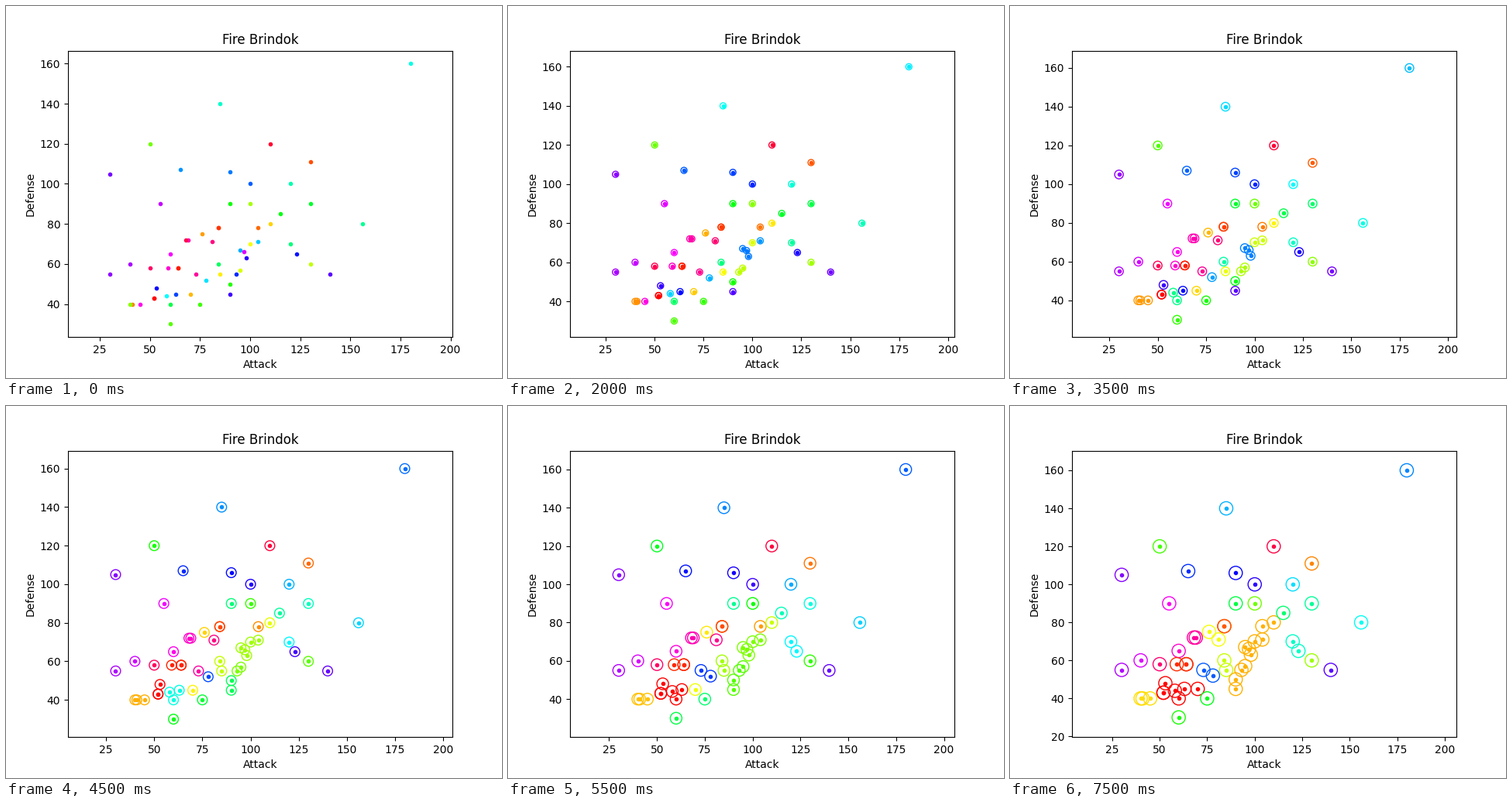
Recreate the animation shown at these times as a matplotlib script. Size 640 by 480 pixels, loop 8000 ms.

```python
import numpy as np
import matplotlib.pyplot as plt
from matplotlib.animation import FuncAnimation
from matplotlib.patches import Circle

FRAMES = 16
INTERVAL = 500


def evolve(attack, defense, *gains, stages=1):
    """Stats of a family: a start, then each gain added `stages` times."""
    points = [np.array((attack, defense))]
    for gain in gains:
        for _ in range(stages):
            points.append(points[-1] + gain)
    return points


starters = evolve(52, 43, (12, 15), 20)
families = [
    starters, evolve(130, 111), evolve(104, 78),
    evolve(41, 40, 35), evolve(70, 45, (40, 35)), evolve(85, 55, 15),
    evolve(95, 57), evolve(130, 60, (-30, 30)),
    starters, evolve(40, 40, (10, 80)),
    evolve(60, 30, (15, 10), stages=2), evolve(90, 90),
    evolve(115, 85, (15, 5)),
    evolve(60, 40), evolve(84, 60, (36, 10), stages=2),
    evolve(120, 100), evolve(85, 140), evolve(180, 160),
    evolve(58, 44, (20, 8), (26, 19)), evolve(95, 67),
    evolve(65, 107), evolve(90, 106), evolve(100, 100),
    evolve(63, 45, (30, 10), stages=2),
    evolve(53, 48, (45, 15)), evolve(90, 45, (50, 10)), evolve(30, 105),
    evolve(30, 55, (10, 5), (15, 30)), evolve(97, 66), evolve(60, 65),
    evolve(45, 40, (14, 18), (10, 14)), evolve(73, 55, (8, 16)),
    evolve(50, 58, (18, 14)), evolve(110, 120),
]
stats = np.vstack([point for family in families for point in family])

gaps = ((stats[:, None] - stats[None]) ** 2).sum(axis=2)
levels = np.unique(gaps)[:FRAMES]


def clusters(limit):
    """Single-linkage labels, numbered by first member."""
    labels = np.arange(len(stats))
    for a, b in np.argwhere(gaps <= limit):
        low, high = sorted((labels[a], labels[b]))
        labels[labels == high] = low
    return np.unique(labels, return_inverse=True)[1]


fig, ax = plt.subplots(figsize=(6.4, 4.8), dpi=100)


def fit_view(radius):
    low, high = stats.min(axis=0), stats.max(axis=0)
    cx, cy = (low + high) / 2
    half = 1.1 * ((high - low)[1] / 2 + radius)
    box = ax.get_window_extent()
    wide = half * box.width / box.height
    ax.set_xlim(cx - wide, cx + wide)
    ax.set_ylim(cy - half, cy + half)


def draw(step):
    ax.clear()
    radius = np.sqrt(levels[step]) / 2
    labels = clusters(levels[step])
    cmap = plt.get_cmap("hsv", labels.max() + 2)
    for point, label in zip(stats, labels):
        color = cmap(int(label))
        ax.plot(*point, ".", color=color)
        ax.add_patch(Circle(point, radius, fill=False, edgecolor=color))
    fit_view(radius)
    ax.set_title("Fire Brindok")
    ax.set_xlabel("Attack")
    ax.set_ylabel("Defense")
    return []


anim = FuncAnimation(fig, draw, frames=FRAMES, init_func=lambda: [],
                     interval=INTERVAL, repeat=True, repeat_delay=0)
plt.show()
```
